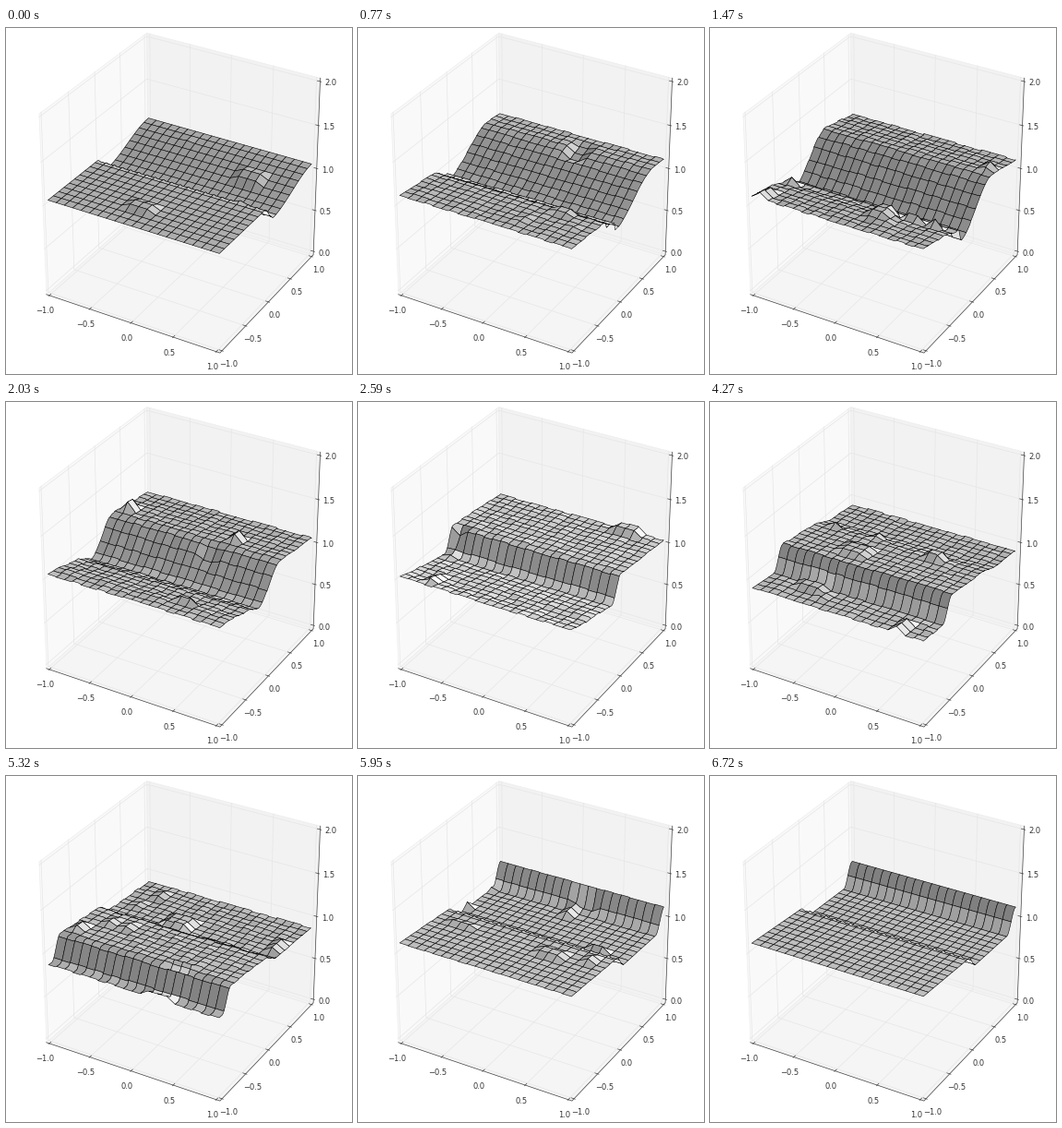
Write a matplotlib script that moves like this. It is 375 px wide and 375 px high and loops after 7 s.

```python
import numpy as np
import matplotlib.pyplot as plt
from matplotlib.animation import FuncAnimation
from matplotlib.collections import LineCollection, PolyCollection

SIZE, DPI = 375, 50
FRAMES, STEP = 100, 70
N, STRIDE = 101, 5
PAD = 1 + 1 / 24          # half width of the box, ticks end at 1
LOW, HIGH = 1 - PAD, 1 + PAD
CELL = 0.1
LAG, REST = 0.35, 6.0     # seconds: delay inside blocks, wave comes to rest

rng = np.random.default_rng(4)
axis = np.linspace(-1, 1, N)
X, Y = np.meshgrid(axis, axis, indexing="ij")


def project(x, y, z):
    """Data coordinates to pixels and distance from the eye."""
    x, y, z = np.asarray(x) / 2, np.asarray(y) / 2, (np.asarray(z) - 1) / 2
    c, s = np.sqrt(3) / 2, 0.5
    depth = 10 - (c * s * x - c * c * y + s * z)
    right = c * x + s * y
    up = -s * s * x + s * c * y + c * z
    return 190.6 + 2088 * right / depth, 172.4 - 2148 * up / depth, depth


def screen(points):
    px, py, _ = project(*np.transpose(points))
    return np.column_stack([px, py])


def profile(t):
    """Height along y: a ramp that steepens into a front moving towards -y."""
    t = np.clip(t, 0, REST)
    run = max(0, (t - 1.5) / (REST - 1.5)) ** 1.4
    front = 0.1 + 0.46 * max(0, 1 - t / 1.5) - 1.2 * run
    width = 0.17 + 0.7 * max(0, 1 - (t / 2.6) ** 2)
    swell = np.exp(-((t - 1.4) / 0.7) ** 2)
    arch = np.sin(np.pi * t / REST)

    foot, crest = front - width / 2, front + width / 2
    tail = max(1.95 - 0.42 * t, -0.06)
    end = min(tail + 0.16 + 0.35 * arch, foot + 1.98)
    z_foot = 0.87 - 0.08 * swell
    z_crest = 1.06 + 0.06 * min(t, 1) + 0.09 * swell
    ys = np.array([foot, crest, tail, end, foot + 2])
    zs = np.array([z_foot, z_crest, 1.05, 0.9 + 0.06 * arch, z_foot])

    y = (axis - foot) % 2 + foot
    seg = np.clip(np.searchsorted(ys, y, "right") - 1, 0, 3)
    f = (y - ys[seg]) / (ys[seg + 1] - ys[seg])
    f = np.where(seg % 2 == 0, f * f * (3 - 2 * f), f)
    return zs[seg] + f * (zs[seg + 1] - zs[seg])


def band(v, start, width):
    """One on the band, falling to zero over a cell at each side."""
    return np.clip(np.minimum(v - start, start + width - v) / CELL + 1, 0, 1)


def make_block():
    start = rng.uniform(-0.3, 6.3)
    x, y = np.round(rng.uniform(-1, 0.9, 2) / CELL) * CELL
    w, h = rng.integers(0, 3, 2) * CELL
    mask = band(X, x, w) * band(Y, y, h)
    return start, start + rng.uniform(0.15, 0.4), mask, rng.uniform(0, 0.06)


blocks = [make_block() for _ in range(140)]
phase = np.kron(rng.uniform(0, 2 * np.pi, (21, 21)), np.ones((5, 5)))[:N, :N]


def surface(t):
    now, late = profile(t), profile(t - LAG)
    mask, lift = np.zeros((N, N)), np.zeros((N, N))
    for start, end, m, dz in blocks:
        if start <= t < end:
            mask = np.maximum(mask, m)
            lift = np.maximum(lift, dz * m)
    ripple = 0.007 * np.clip(t, 0, 1) * np.clip((6.2 - t) / 0.6, 0, 1)
    return now + mask * (late - now) + lift + ripple * np.sin(phase + 5 * t)


# Perimeter of every cell
up, down = np.arange(STRIDE), np.arange(STRIDE, 0, -1)
lo, hi = np.zeros(STRIDE, int), np.full(STRIDE, STRIDE)
corner = np.arange(0, N - 1, STRIDE)
ci, cj = (a.ravel()[:, None] for a in np.meshgrid(corner, corner, indexing="ij"))
I = ci + np.concatenate([lo, up, hi, down])
J = cj + np.concatenate([up, hi, down, lo])


def shade(pts):
    n = pts.shape[1]
    a, b, c = pts[:, 0], pts[:, n // 3], pts[:, 2 * n // 3]
    normal = np.cross(a - b, b - c)
    normal /= np.linalg.norm(normal, axis=1, keepdims=True)
    s = normal @ [-1, -1, 0.5]
    return 0.5 + 0.5 * (s - s.min()) / (np.ptp(s) + 1e-9)


fig = plt.figure(figsize=(SIZE / DPI, SIZE / DPI), dpi=DPI, facecolor="white")
ax = fig.add_axes([0, 0, 1, 1])
ax.set_xlim(0, SIZE)
ax.set_ylim(SIZE, 0)
ax.axis("off")


def lines(segments, color, width, order):
    ax.add_collection(LineCollection([screen(s) for s in segments], colors=color,
                                     linewidths=width, zorder=order))


def label(point, dx, dy, value):
    x, y = screen([point])[0]
    text = f"{value:.1f}".replace("-", "\u2212")
    ax.text(x + dx, y + dy, text, size=12, family="DejaVu Sans", color="0.2",
            ha="center", va="center", zorder=4)


def draw_box():
    p = PAD
    panes = [
        ([(-p, -p, LOW), (-p, p, LOW), (-p, p, HIGH), (-p, -p, HIGH)], "0.975"),
        ([(-p, p, LOW), (p, p, LOW), (p, p, HIGH), (-p, p, HIGH)], "0.95"),
        ([(-p, -p, LOW), (p, -p, LOW), (p, p, LOW), (-p, p, LOW)], "0.9625"),
    ]
    for pts, color in panes:
        ax.add_collection(PolyCollection([screen(pts)], facecolors=color,
                                         edgecolors="0.93", linewidths=1, zorder=0))
    grid, ticks = [], []
    inner, outer = p - 0.035, p + 0.017
    for v in np.linspace(-1, 1, 5):
        z = v + 1
        grid += [[(v, -p, LOW), (v, p, LOW), (v, p, HIGH)],
                 [(p, v, LOW), (-p, v, LOW), (-p, v, HIGH)],
                 [(-p, -p, z), (-p, p, z), (p, p, z)]]
        ticks += [[(v, -inner, LOW), (v, -outer, LOW)],
                  [(inner, v, LOW), (outer, v, LOW)],
                  [(inner, p, z), (outer, p, z)]]
        label((v, -p, LOW), -4.5, 17, v)
        label((p, v, LOW), 7, 14.5, v)
        label((p, p, z), 11.5, 2, z)
    lines(grid, "0.9", 1, 1)
    edges = [[(-p, -p, LOW), (p, -p, LOW), (p, p, LOW), (p, p, HIGH)]]
    lines(edges + ticks, "0.2", 0.9, 2)


draw_box()
mesh = PolyCollection([], edgecolors="black", linewidths=0.8, zorder=3)
ax.add_collection(mesh)


def update(frame):
    z = surface(frame * STEP / 1000)
    px, py, depth = project(X, Y, z)
    order = np.argsort(-depth[I, J].mean(axis=1))
    gray = shade(np.stack([X[I, J], Y[I, J], z[I, J]], axis=-1))[order]
    mesh.set_verts(np.stack([px[I, J], py[I, J]], axis=-1)[order])
    mesh.set_facecolor(np.repeat(gray[:, None], 3, axis=1))
    return [mesh]


anim = FuncAnimation(fig, update, frames=FRAMES, interval=STEP,
                     init_func=lambda: update(0), repeat=True, repeat_delay=0)
plt.show()
```
